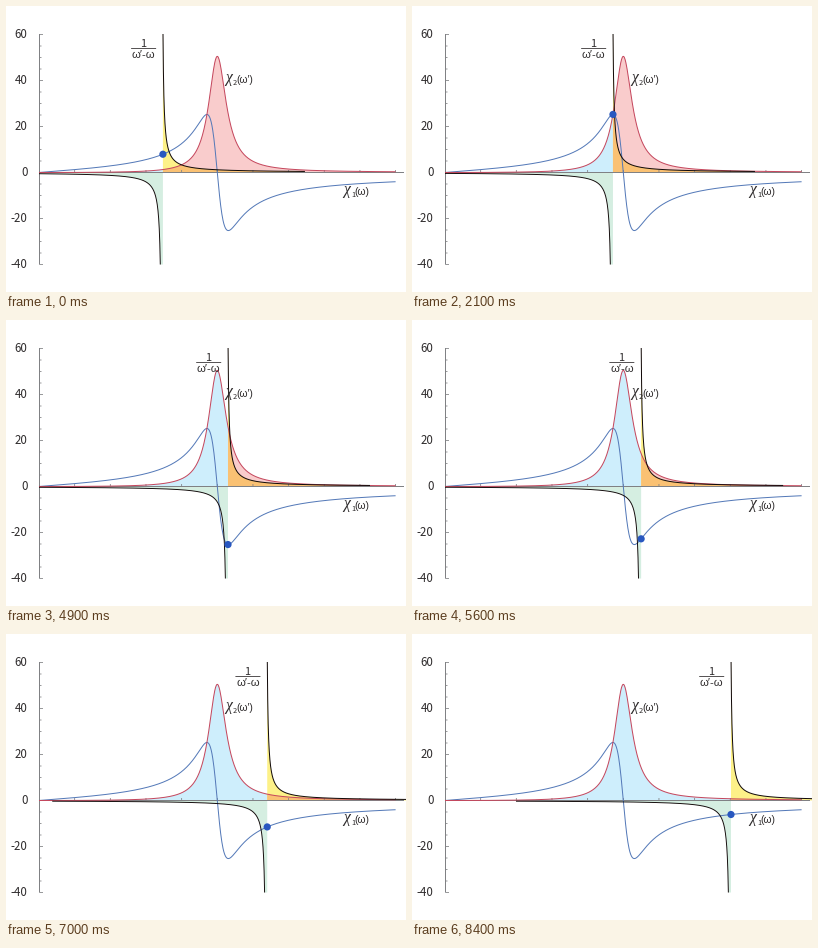
A matplotlib script that plays this animation: 400x286 px, repeating every 9.1 s.

```python
import numpy as np
import matplotlib.pyplot as plt
from matplotlib.animation import FuncAnimation
from matplotlib.patches import Circle

W, H, DPI = 400, 286, 100
X0, Y0 = 33.0, 166.5          # plot origin in pixels
AXIS_X = 33.5
SX, SY = 178.3, 2.3           # pixels per unit of frequency and of response
TOP, BOTTOM = 28, 258.5
GAMMA, STRENGTH = 0.12, 6.06
POLE = 150                    # hyperbola strength in square pixels

# pole position relative to the resonance, one value per step
OFFSETS = [-0.305, -0.18, -0.10, -0.058, -0.03, 0, 0.03,
           0.06, 0.10, 0.186, 0.28, 0.397, 0.604]

BLUE, RED, BLACK, AXIS = "#5479b8", "#c5475d", "#120a0a", "#808184"
PINK, YELLOW, ORANGE = "#f9cccc", "#fdf188", "#fac173"
SKY, MINT, DOT, INK = "#ceeefc", "#d5eee1", "#2857c0", "#2e2b2c"


def pt(px):
    return px * 72 / DPI


def chi(w):
    """Real and imaginary response, in pixels above the axis."""
    d = 1 - w**2
    scale = SY * STRENGTH * w / (d**2 + (GAMMA * w)**2)
    return scale * d, scale * GAMMA * w


def chi2_at(x):
    return np.where(x <= X0 + 2 * SX, chi((x - X0) / SX)[1], 0)


def outline(x, h):
    """Closed polygon between the axis and heights h."""
    xs = np.concatenate([[x[0]], x, [x[-1]]])
    ys = np.concatenate([[Y0], Y0 - h, [Y0]])
    return np.column_stack([xs, ys])


fig = plt.figure(figsize=(W / DPI, H / DPI), dpi=DPI, facecolor="white")
ax = fig.add_axes([0, 0, 1, 1])
ax.set_xlim(0, W)
ax.set_ylim(H, 0)
ax.axis("off")


def line(x, y, color, width, z):
    return ax.plot(x, y, color=color, lw=pt(width), zorder=z, snap=False,
                   solid_capstyle="butt")[0]


def label(x, y, s, size, font="Liberation Sans", **kw):
    return ax.text(x, y, s, fontsize=pt(size), family=font, color=INK,
                   va="baseline", zorder=9, **kw)


def area(color, z):
    return ax.fill([0, 0, 0], [0, 0, 0], color=color, lw=0, zorder=z)[0]


# axes and ticks
line([AXIS_X, AXIS_X], [TOP, BOTTOM], AXIS, 1, 3)
line([AXIS_X, 398], [Y0, Y0], AXIS, 1, 3)
for v in range(-40, 61, 5):
    y = Y0 - v * SY
    line([AXIS_X, AXIS_X + (3.5 if v % 20 == 0 else 2)], [y, y], AXIS, 0.8, 3)
    if v % 20 == 0:
        label(21.5, y + 3.3, str(v), 11.5, "Noto Sans CJK JP", ha="right")
for k in range(1, 11):
    x = X0 + 0.2 * k * SX
    line([x, x], [Y0, Y0 - 2.5], AXIS, 0.8, 3)

# response curves
w = np.linspace(0, 2, 900)
chi1, chi2 = chi(w)
line(X0 + w * SX, Y0 - chi1, BLUE, 1, 4)
line(X0 + w * SX, Y0 - chi2, RED, 1, 5)


def curve_name(x, y, sub, arg):
    label(x, y - 1.5, "χ", 15.5, "Liberation Serif", style="italic")
    label(x + 7.4, y + 2, sub, 7.5, "Noto Sans CJK JP")
    label(x + 11.2, y, arg, 10.3)


curve_name(219.5, 77, "2", "(ω′)")
curve_name(337.5, 189, "1", "(ω)")

# moving parts
pink, sky, mint = area(PINK, 1), area(SKY, 1), area(MINT, 1)
yellow, orange = area(YELLOW, 1.5), area(ORANGE, 2)
left = line([], [], BLACK, 0.95, 6)
right = line([], [], BLACK, 1, 6)
bar = line([], [], INK, 0.8, 9)
one = label(0, 40.8, "1", 11, "Noto Sans CJK JP", ha="center")
denom = label(0, 52.5, "ω′-ω", 11.2, ha="center")
dot = ax.add_patch(Circle((0, 0), 3.6, color=DOT, lw=0, zorder=10))


def update(i):
    wp = 1 + OFFSETS[i]
    xp = X0 + wp * SX
    mid = xp - 1
    start, end = max(X0, xp - 215), xp + 142

    # hyperbola branches, spaced finely near the pole
    xl = mid - np.geomspace(POLE / (BOTTOM - Y0), mid - start, 300)
    xr = mid + np.geomspace(POLE / (Y0 - TOP), end - mid, 400)
    left.set_data(xl, Y0 - POLE / (xl - mid))
    right.set_data(xr, Y0 - POLE / (xr - mid))

    before = np.linspace(X0, xp, 500)
    after = np.linspace(xp, X0 + 2 * SX, 500)
    sky.set_xy(outline(before, chi2_at(before)))
    pink.set_xy(outline(after, chi2_at(after)))

    xm = np.append(xl[::-1], xp)
    depth = np.append(POLE / (xl[::-1] - mid), Y0 - BOTTOM)
    mint.set_xy(outline(xm, depth))

    xy = np.append(xp, xr[xr > xp])
    height = np.minimum(POLE / (xy - mid), Y0 - TOP)
    yellow.set_xy(outline(xy, height))
    orange.set_xy(outline(xy, np.minimum(height, chi2_at(xy))))

    cx = xp - 19.3
    bar.set_data([cx - 12.5, cx + 12.5], [42.5, 42.5])
    one.set_x(cx - 0.7)
    denom.set_x(cx)
    dot.center = (xp, Y0 - chi(wp)[0])
    return pink, sky, mint, yellow, orange, left, right, bar, one, denom, dot


anim = FuncAnimation(fig, update, frames=len(OFFSETS), interval=700,
                     repeat=True, repeat_delay=0, blit=False)
plt.show()
```
